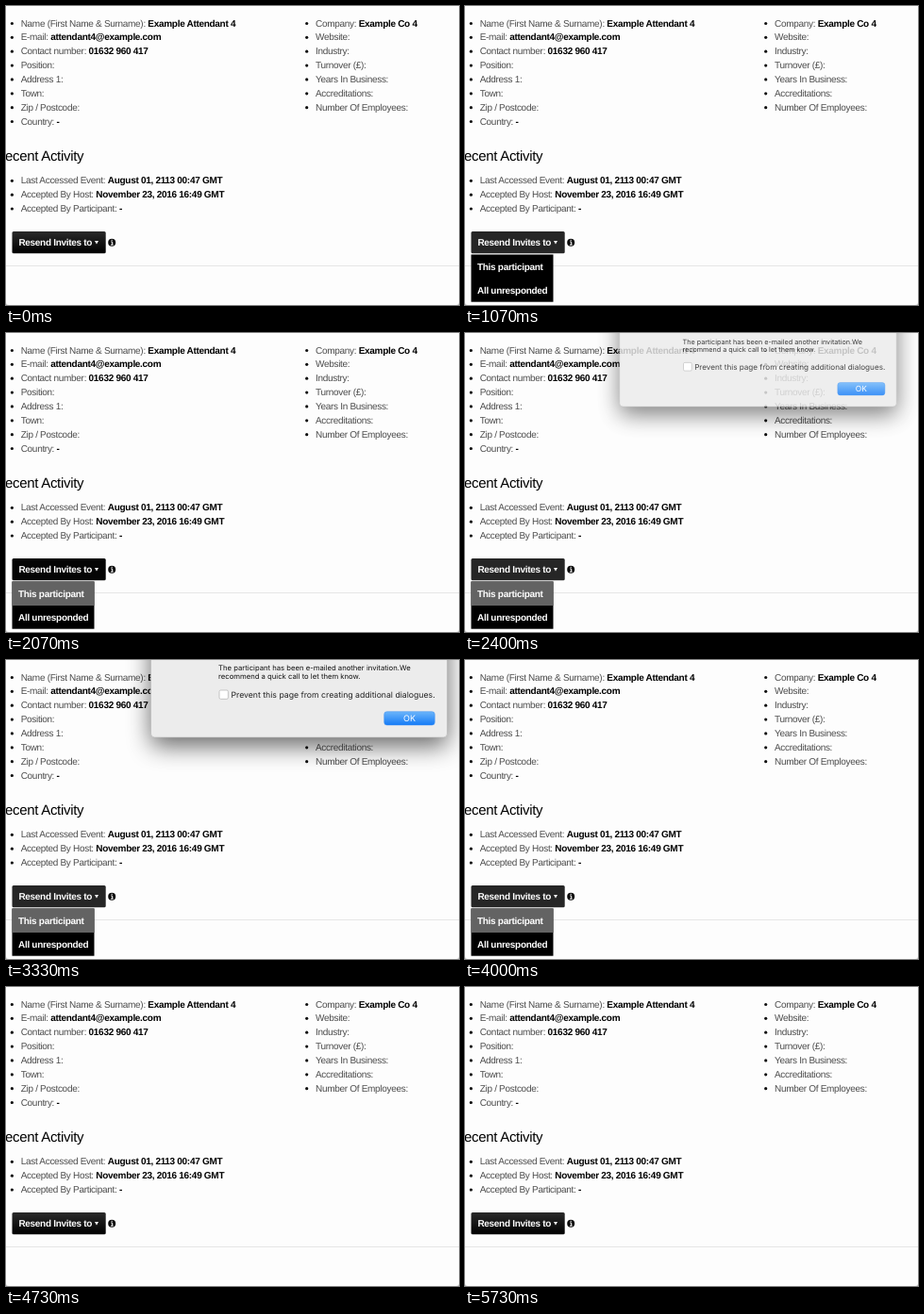
These frames come from a looping animation (480x317 px, 5.87 s). An HTML page:

```html
<!DOCTYPE html>
<html lang="en">
<head>
<meta charset="utf-8">
<title>Resend invites</title>
<style>
  html, body { margin: 0; width: 100%; height: 100%; overflow: hidden; background: #c4c4c4; }
  svg { display: block; width: 100vw; height: 100vh; }
  text {
    font: 10px "Liberation Sans", Arial, sans-serif; letter-spacing: -.3px;
    fill: #4c4c4c; white-space: pre; text-rendering: geometricPrecision;
  }
  .b { font-weight: bold; fill: #000; }
  .w { font-weight: bold; fill: #fff; }
  .h { font-size: 15px; fill: #000; }
  #dialog text { font-family: Inter, sans-serif; letter-spacing: 0; fill: #222; }
  #dialog .msg { font-size: 7.7px; fill: #111; }
  #dialog .opt { font-size: 8.7px; }
  #dialog .ok { font-size: 9px; fill: #fff; }
</style>
</head>
<body>
<svg viewBox="0 0 480 317" preserveAspectRatio="none">
  <defs>
    <linearGradient id="black" x2="0" y2="1"><stop stop-color="#2a2a2a"/><stop offset="1" stop-color="#000"/></linearGradient>
    <linearGradient id="blue" x2="0" y2="1"><stop stop-color="#6cb5fa"/><stop offset="1" stop-color="#157bf6"/></linearGradient>
    <filter id="blur" filterUnits="userSpaceOnUse" x="80" y="-120" width="460" height="300"><feGaussianBlur stdDeviation="13"/></filter>
  </defs>
  <rect y="-10" width="480" height="327" rx="3" fill="#fdfdfd"/>
  <g id="lists"></g>
  <text class="h" x="-11.6" y="163.8">Recent Activity</text>
  <path d="M0 275.5H480" stroke="#e6e6e6"/>
  <rect id="button" x="6.5" y="239" width="99.2" height="23.2" rx="1.5"/>
  <text class="w" x="13.4" y="254.3">Resend Invites to</text>
  <path d="M94 249h4l-2 3.6z" fill="#fff"/>
  <circle cx="112.2" cy="250.8" r="4" fill="#0a0a0a"/>
  <path d="M111.2 250h1.5v3M111 253.1h2.7M111.6 248.3h1.2" stroke="#fff" fill="none"/>
  <g id="menu">
    <rect x="6.5" y="263.5" width="87" height="50.2" fill="#000"/>
    <rect id="hover" x="6.5" y="263.5" width="87" height="25.5" fill="#636363"/>
    <text class="w" x="13" y="279.9">This participant</text>
    <text class="w" x="13" y="304.7">All unresponded</text>
  </g>
  <g id="dialog">
    <rect x="154" y="-60" width="313.5" height="151" rx="4" filter="url(#blur)" opacity=".6"/>
    <rect x="153.5" y="-60" width="314" height="142" rx="4" fill="#ececec" stroke="#b5b5b5" stroke-width=".6"/>
    <text class="msg" x="225" y="11">The participant has been e-mailed another invitation.We</text>
    <text class="msg" x="225" y="19.7">recommend a quick call to let them know.</text>
    <rect x="226" y="32" width="9.4" height="9.4" rx="1.5" fill="#fff" stroke="#b8b8b8" stroke-width=".8"/>
    <text class="opt" x="238.5" y="39.8">Prevent this page from creating additional dialogues.</text>
    <rect x="400.7" y="54.7" width="53.6" height="14.3" rx="3" fill="url(#blue)" stroke="#3d8ff0" stroke-width=".5"/>
    <text class="ok" x="427.5" y="65.2" text-anchor="middle">OK</text>
  </g>
</svg>
<script>
const LOOP = 5870, STEP = 200 / 3, PITCH = 14.86;
const $ = id => document.getElementById(id);
const [button, menu, hover, dialog] = ["button", "menu", "hover", "dialog"].map($);

function list(x, y, rows) {
  return rows.map(([label, value = ""], i) => {
    const base = y + i * PITCH;
    return `<circle cx="${x - 9.3}" cy="${base - 3.1}" r="1.6" fill="#111"/>
      <text x="${x}" y="${base}">${label}: <tspan class="b">${value}</tspan></text>`;
  }).join("");
}

$("lists").innerHTML =
  list(15.7, 21.6, [
    ["Name (First Name &amp; Surname)", "Example Attendant 4"],
    ["E-mail", "attendant4@example.com"],
    ["Contact number", "01632 960 417"],
    ["Position"], ["Address 1"], ["Town"], ["Zip / Postcode"], ["Country", "-"]
  ]) +
  list(328, 21.6, [
    ["Company", "Example Co 4"],
    ["Website"], ["Industry"], ["Turnover (£)"], ["Years In Business"],
    ["Accreditations"], ["Number Of Employees"]
  ]) +
  list(15.7, 188.4, [
    ["Last Accessed Event", "August 01, 2113 00:47 GMT"],
    ["Accepted By Host", "November 23, 2016 16:49 GMT"],
    ["Accepted By Participant", "-"]
  ]);

const clamp = v => Math.min(1, Math.max(0, v));
const show = (el, on) => el.setAttribute("visibility", on ? "inherit" : "hidden");

function draw(time) {
  // The screen refreshes at 15 steps a second
  const t = Math.floor(time / STEP + 0.1) * STEP;
  const open = t > 1060 && t < 4260;
  const hovered = t > 1790;
  show(menu, open);
  show(hover, open && hovered);
  button.setAttribute("fill", !open ? "url(#black)" : hovered && t < 2260 ? "#050505" : "#262626");

  // The alert zooms in, then fades away
  const enter = clamp((t - 2267) / 200), leave = clamp((t - 3800) / 200);
  const scale = 1 - 0.58 * (1 - enter) ** 2;
  const alpha = (1 - (1 - enter) ** 1.6) * (1 - leave);
  show(dialog, alpha > 0);
  dialog.setAttribute("opacity", alpha);
  dialog.setAttribute("transform", `translate(310.5 22) scale(${scale}) translate(-310.5 -22)`);
}

const start = performance.now();
function tick() {
  draw((performance.now() - start) % LOOP);
  requestAnimationFrame(tick);
}
tick();
</script>
</body>
</html>
```
